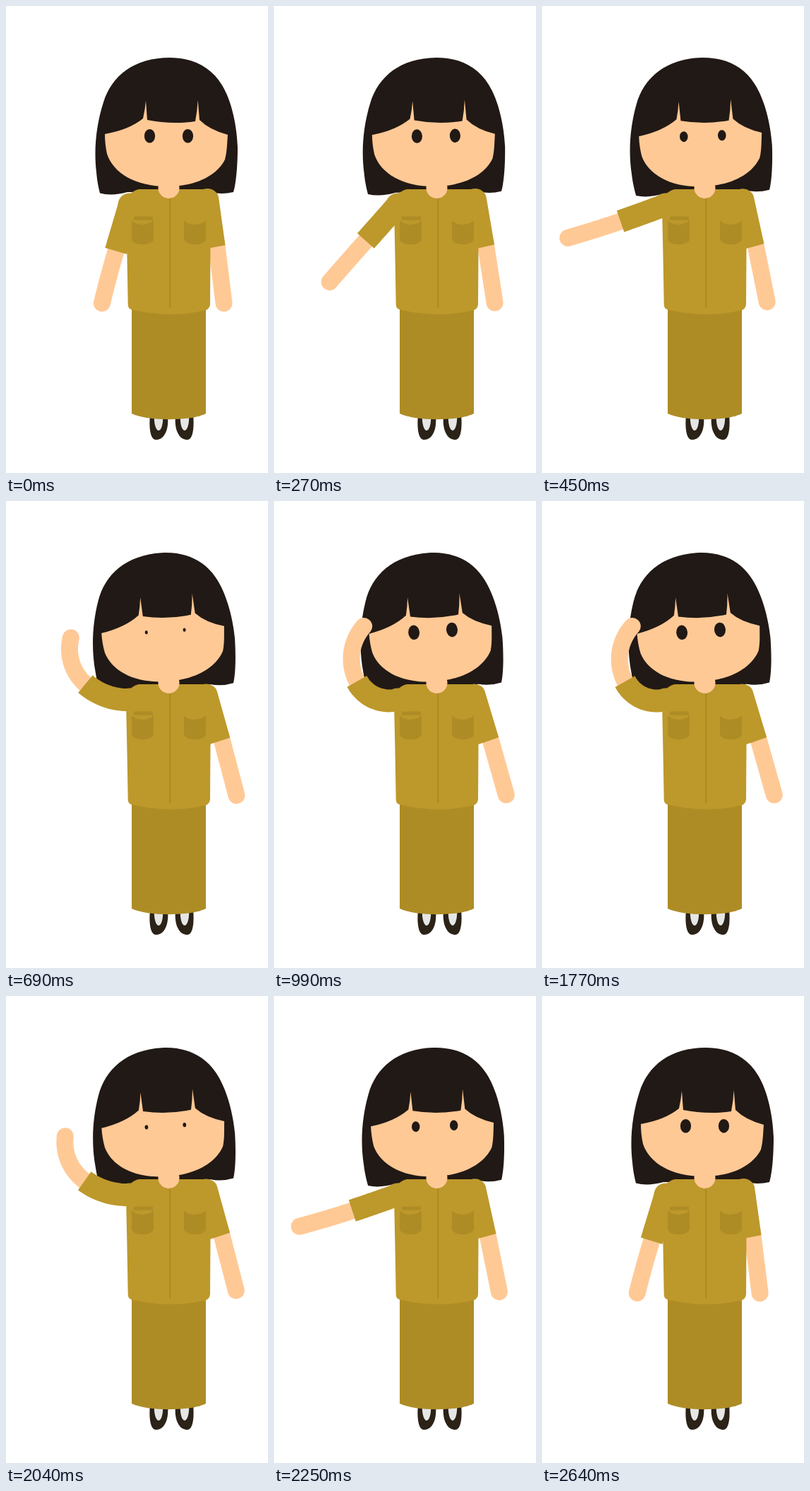
These frames come from a looping animation (371x660 px, 2700 ms). An HTML page:

```html
<!DOCTYPE html>
<html lang="en">
<head>
<meta charset="utf-8">
<title>Salute</title>
<style>
  html, body { margin: 0; width: 100%; height: 100%; overflow: hidden; background: #fff; }
  svg { display: block; width: 100vw; height: 100vh; }
  .hair { fill: #211915; }
  .skin { fill: #ffc996; }
  .limb { fill: none; stroke: #ffc996; stroke-width: 24; stroke-linecap: round; }
  .shirt { fill: #bd982b; }
  .sleeve { fill: none; stroke: #bd982b; stroke-width: 32; }
  .skirt { fill: #ae8c25; }
  .shoe { fill: #2b2218; }
  .sock { fill: #e6e6e4; }
</style>
</head>
<body>
<svg viewBox="0 0 371 660">
  <defs>
    <g id="foot">
      <path class="shoe" d="M204 578C202 598 205 613 212 613Q219 613 223 608C229 600 230 590 229 578Z"/>
      <path class="sock" d="M210 578C209 592 213 600 216 600C220 600 223 590 222 578Z"/>
    </g>
    <path id="pocket" d="M178 303Q182 308 193 309Q205 308 209 303V331Q204 337 193 337Q183 337 178 331Z"/>
  </defs>

  <use href="#foot"/>
  <use href="#foot" transform="matrix(-1 0 0 1 469 0)"/>
  <path class="skirt" d="M178 420H283V576C262 587 200 587 178 576Z"/>

  <g id="head">
    <path class="hair" d="M232 73C182 73 150 98 138 136C128 167 124 202 128 235C129 247 131 257 133 264.5Q150 269 172 263H290Q305 267 322 263C326 250 328 225 328 200C327 170 320 135 306 112C290 85 262 73 232 73Z"/>
    <path class="skin" d="M140 181Q174 175 194 159Q197 146 198 134L200 161Q234 168 268 163Q271 148 271.7 133L274 161Q288 175 314 182C313 195 313 206 310 217C299 239 270 255 228 255C183 255 152 236 143 209C141 200 140 190 140 181Z"/>
    <ellipse class="hair eye" cx="203.5" cy="183.7"/>
    <ellipse class="hair eye" cx="257.5" cy="183.7"/>
  </g>

  <g id="rest">
    <path class="limb" d="M298 335L308.5 420"/>
    <path class="shirt" d="M272 262Q287 254 296 262Q300 265 301 270L310.5 338L289 342L270 345Z"/>
  </g>
  <path id="fore" class="limb"/>
  <path id="cuff" class="sleeve"/>
  <circle class="shirt" cx="175" cy="281" r="16.5"/>

  <path class="shirt" d="M170 285Q170 263 188 259H280Q289 261 289.5 275V345L289 422Q288 428 283 430Q231 442 178 429Q173 428 172.7 422L171.3 345Z"/>
  <circle class="skin" cx="230.5" cy="257" r="15"/>
  <path class="skirt" d="M231 272H233.4V427H231ZM181 297.5H208V302.5H181Z"/>
  <use class="skirt" href="#pocket"/>
  <use class="skirt" href="#pocket" x="74"/>
</svg>
<script>
const $ = id => document.getElementById(id);
const LOOP = 2700, STEP = 30, MIRROR = 90.2;
const SHOULDER = [175, 281], UPPER = 68;
const eyes = document.querySelectorAll('.eye');

// [step, value] keys; angles in degrees, clockwise from straight down
const swing = [[1.3, 16.5], [15, 69], [19, 81], [23, 88.4], [30, 75.6], [45, 85.3]];
const upperBend = [[1.3, 0], [15, 2], [19, 22], [23, 42.6], [30, 77], [45, 63.4]];
const foreBend = [[1.3, -3], [15, 3], [19, 34], [23, 63], [30, 70], [45, 69]];
const foreLength = [[1.3, 76.4], [15, 78], [19, 73], [23, 72], [30, 84], [45, 79.4]];
const lids = [[8, 1], [15, 0.76], [23, 0.27], [24.5, 0.2], [30, 1.05]];

const rad = d => d * Math.PI / 180;
const clamp = x => Math.min(1, Math.max(0, x));
const smooth = x => x * x * (3 - 2 * x);

// monotone cubic through the keys
function track(keys, u) {
  const last = keys.length - 1;
  if (u <= keys[0][0]) return keys[0][1];
  if (u >= keys[last][0]) return keys[last][1];
  const slope = i => (keys[i + 1][1] - keys[i][1]) / (keys[i + 1][0] - keys[i][0]);
  const tangent = i => {
    if (i === 0 || i === last) return 0;
    const a = slope(i - 1), b = slope(i);
    return a * b > 0 ? 2 * a * b / (a + b) : 0;
  };
  let i = 0;
  while (u > keys[i + 1][0]) i++;
  const [x0, y0] = keys[i], [x1, y1] = keys[i + 1];
  const w = x1 - x0, s = (u - x0) / w, r = 1 - s;
  return y0 * r * r * (1 + 2 * s) + y1 * s * s * (3 - 2 * s)
    + w * s * r * (r * tangent(i) - s * tangent(i + 1));
}

// points of an arc that leaves at one angle and turns evenly by another
function arc([x, y], angle, turn, length) {
  const pts = [], n = 20;
  for (let i = 0; i <= n; i++) {
    const f = i / n, half = rad(turn * f / 2);
    const chord = length * f * (Math.abs(half) > 1e-6 ? Math.sin(half) / half : 1);
    const dir = rad(angle) + half;
    pts.push([x - chord * Math.sin(dir), y + chord * Math.cos(dir)]);
  }
  return pts;
}

const line = pts => 'M' + pts.map(p => p.map(v => v.toFixed(2)).join(' ')).join('L');

function draw(ms) {
  const n = Math.floor((ms % LOOP) / STEP);
  const u = Math.min(n, MIRROR - n);
  const lean = smooth(clamp((u - 1) / 28));
  $('head').setAttribute('transform', `rotate(${-4.1 * lean} 230 260)`);
  $('rest').setAttribute('transform', `rotate(${-8.8 * lean} 288 286)`);

  const open = track(lids, u);
  for (const e of eyes) {
    e.setAttribute('rx', 7.6 * open);
    e.setAttribute('ry', 9.8 * open);
  }

  const angle = track(swing, u), turn = track(upperBend, u);
  const upper = arc(SHOULDER, angle, turn, UPPER);
  const elbow = upper[upper.length - 1];
  const fore = arc(elbow, angle + turn, track(foreBend, u), track(foreLength, u));
  $('cuff').setAttribute('d', line(upper));
  $('fore').setAttribute('d', line([...upper.slice(-3), ...fore]));
}

const begin = performance.now();
function loop() {
  draw(performance.now() - begin);
  requestAnimationFrame(loop);
}
draw(0);
requestAnimationFrame(loop);
</script>
</body>
</html>
```
